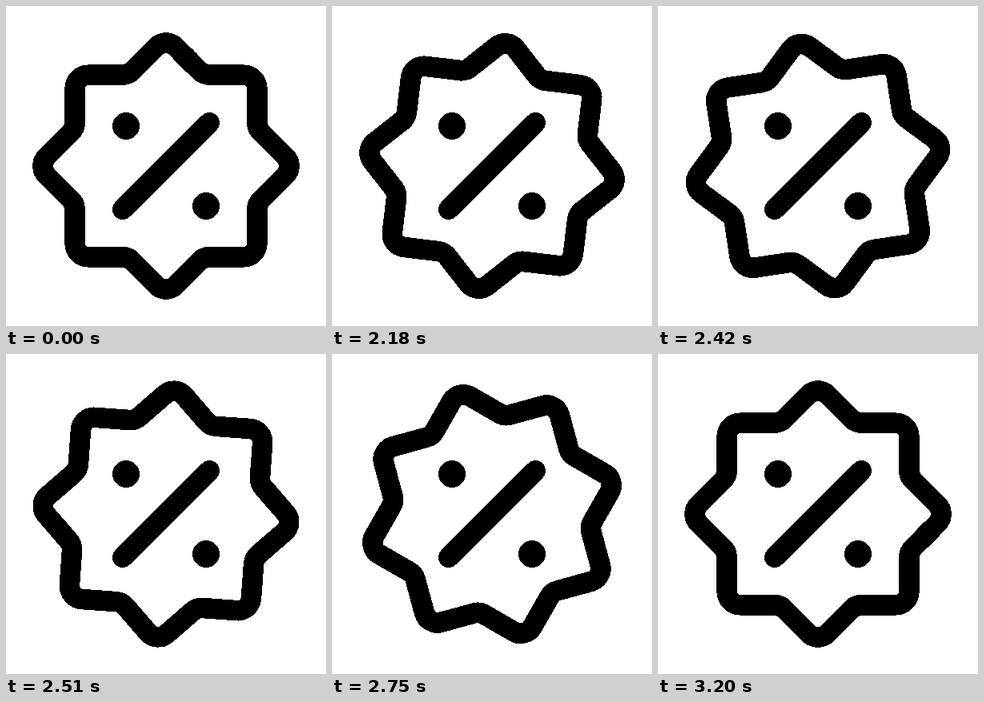
Animation, 400 px wide and 400 px high, one loop 3230 ms. Source, as an HTML page with a canvas:

```html
<!DOCTYPE html>
<html lang="en">
<head>
<meta charset="utf-8">
<title>Discount badge</title>
<style>
  html, body { margin: 0; width: 100%; height: 100%; overflow: hidden; background: #fff; }
  canvas { display: block; }
</style>
</head>
<body>
<canvas id="stage" width="400" height="400"></canvas>
<script>
const ctx = document.getElementById('stage').getContext('2d', { willReadFrequently: true });
const LOOP = 3230, START = 2000, STEP = 30, STEPS = 40, TURN = 90;
const UNIT = 400 / 24;
const TIP = 161, VALLEY = TIP * Math.SQRT1_2 / Math.cos(Math.PI / 8);
const MIN_ALPHA = 50;

// Cubic bezier easing (0.333, 0, 0.4, 1), solved by bisection
function ease(x) {
  if (x <= 0 || x >= 1) return Math.min(1, Math.max(0, x));
  let lo = 0, hi = 1, s;
  for (let i = 0; i < 30; i++) {
    s = (lo + hi) / 2;
    const u = 1 - s;
    if (3 * u * u * s * 0.333 + 3 * u * s * s * 0.4 + s ** 3 < x) lo = s;
    else hi = s;
  }
  return s * s * (3 - 2 * s);
}

function corner(i) {
  const angle = i * Math.PI / 8, r = i % 2 ? VALLEY : TIP;
  return [r * Math.sin(angle), -r * Math.cos(angle)];
}

// Eight-pointed star with every corner rounded to one unit
const star = new Path2D();
const [a, b] = [corner(0), corner(1)];
star.moveTo((a[0] + b[0]) / 2, (a[1] + b[1]) / 2);
for (let i = 1; i <= 16; i++) star.arcTo(...corner(i), ...corner(i + 1), UNIT);
star.closePath();

const slash = new Path2D();
slash.moveTo(-3.25 * UNIT, 3.25 * UNIT);
slash.lineTo(3.25 * UNIT, -3.25 * UNIT);

const dots = new Path2D();
for (const p of [-3 * UNIT, 3 * UNIT]) {
  dots.moveTo(p + UNIT, p);
  dots.arc(p, p, UNIT, 0, 2 * Math.PI);
}

ctx.lineWidth = 1.5 * UNIT;
ctx.lineCap = 'round';

// Turn soft edges into hard black pixels
function harden() {
  const image = ctx.getImageData(0, 0, 400, 400), { data } = image;
  for (let i = 3; i < data.length; i += 4) data[i] = data[i] > MIN_ALPHA ? 255 : 0;
  ctx.putImageData(image, 0, 0);
}

function draw(step) {
  ctx.setTransform(1, 0, 0, 1, 200, 200);
  ctx.clearRect(-200, -200, 400, 400);
  ctx.fill(dots);
  ctx.stroke(slash);
  ctx.rotate(ease(step / STEPS) * TURN * Math.PI / 180);
  ctx.stroke(star);
  harden();
}

const origin = performance.now();
let shown;
function tick() {
  const time = (performance.now() - origin) % LOOP;
  const step = Math.max(0, Math.floor((time - START) / STEP));
  if (step !== shown) draw(shown = step);
  requestAnimationFrame(tick);
}
tick();
</script>
</body>
</html>
```
